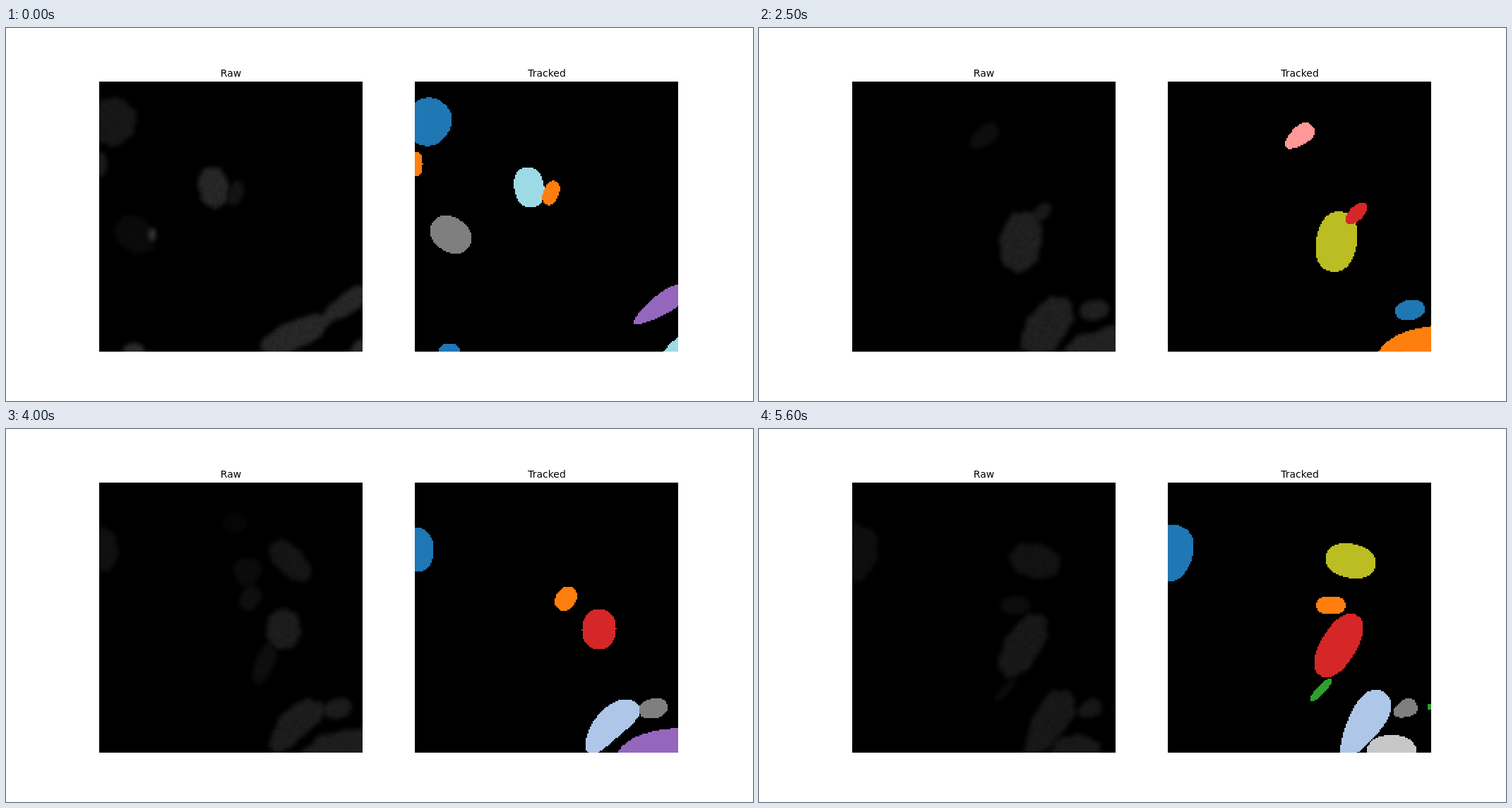
Recreate the animation shown at these times as an HTML page with a canvas. Size 1058 by 529 pixels, loop 5700 ms.

```html
<!DOCTYPE html>
<html lang="en">
<head>
<meta charset="utf-8">
<title>Cell tracking</title>
<style>
  html, body { margin: 0; width: 100%; height: 100%; overflow: hidden; background: #fff; }
  canvas, svg { position: absolute; left: 0; top: 0; }
  text { font: 14px "DejaVu Sans", sans-serif; text-anchor: middle; }
</style>
</head>
<body>
<canvas id="stage" width="1058" height="529"></canvas>
<svg width="1058" height="529">
  <text x="318.5" y="69">Raw</text>
  <text x="766" y="69">Tracked</text>
</svg>
<script>
const ctx = document.getElementById('stage').getContext('2d');
const STEP = 100, LOOP = 5700, PIXEL = 2, SAMPLES = 72;
const KEYS = [0, 700, 1500, 2500, 3500, 4500, 5600];
const TOP = 76, WIDTH = 373, HEIGHT = 383, RAW = 132, TRACKED = 579;

const blue = '#1f77b4', sky = '#aec7e8', orange = '#ff7f0e', peach = '#ffbb78',
  green = '#2ca02c', red = '#d62728', pink = '#ff9896', purple = '#9467bd',
  brown = '#c49c94', gray = '#7f7f7f', silver = '#c7c7c7', olive = '#bcbd22', cyan = '#9edae5';

// A pose is a tilted oval; without a colour it shows only in the raw picture.
const pose = (color, x, y, length, width, tilt = 0, taper = 0, bend = 0) =>
  ({ color, form: [x, y, length, width, tilt, taper, bend] });
const cell = (glow, poses) => ({ glow, poses });

// Poses are numbered by their place in KEYS.
const cells = [
  // left edge
  cell(26, {
    0: pose(blue, 598, 133, 34, 32, -55),
    1: pose(blue, 584, 188, 25, 20, -90, 0.15),
    2: pose(blue, 602, 201, 45, 16, -62),
    4: pose(blue, 578, 177, 36, 24, -90),
    5: pose(blue, 584, 166, 27, 25, -90),
    6: pose(blue, 579, 176, 41, 36, -90, 0.2)
  }),
  cell(30, { 0: pose(orange, 581, 193, 18, 9, 90) }),
  cell(12, { 0: pose(gray, 630, 293, 31, 24, 35) }),
  cell(60, { 0: pose(null, 654, 293, 9, 5, 90) }),
  cell(50, { 0: pose(blue, 628, 461, 16, 14) }),

  // central cell and its neighbours
  cell(44, {
    0: pose(cyan, 741, 226, 29, 21, 80),
    1: pose(null, 760, 230, 54, 28, 38),
    2: pose(null, 782, 260, 55, 16, 80, 0, 30),
    3: pose(olive, 818, 303, 43, 29, 100),
    4: pose(red, 836, 288, 25, 24, 90),
    5: pose(red, 844, 280, 32, 24, 95),
    6: pose(red, 821, 307, 50, 25, 121)
  }),
  cell(22, { 0: pose(orange, 772, 234, 18, 11, -70) }),
  cell(40, { 2: pose(null, 823, 310, 27, 18, -60) }),
  cell(34, { 3: pose(red, 846, 263, 19, 10, -45) }),
  cell(44, { 4: pose(brown, 814, 331, 32, 13, 113) }),
  cell(36, { 4: pose(peach, 789, 204, 21, 19, 90, -0.3) }),
  cell(24, {
    4: pose(orange, 787, 241, 18, 15, -75),
    5: pose(orange, 799, 240, 18, 13, -38),
    6: pose(orange, 810, 250, 21, 13)
  }),
  cell(22, { 6: pose(green, 796, 370, 22, 6, -47) }),

  // top
  cell(20, {
    2: pose(null, 765, 92, 28, 18),
    3: pose(pink, 765, 154, 24, 13, -38, 0.25),
    4: pose(null, 771, 133, 18, 14)
  }),
  cell(34, {
    4: pose(olive, 848, 187, 28, 15, 45, -0.15),
    5: pose(null, 852, 188, 44, 24, 45),
    6: pose(olive, 838, 187, 36, 24, 12)
  }),

  // bottom right
  cell(44, {
    0: pose(null, 855, 436, 52, 20, -25),
    1: pose(null, 848, 434, 48, 21, -30),
    2: pose(sky, 847, 439, 33, 26, -50),
    3: pose(null, 855, 424, 48, 28, -55),
    4: pose(sky, 848, 424, 50, 20, -40, 0, 14),
    5: pose(sky, 861, 415, 49, 22, -50, 0.35),
    6: pose(sky, 856, 420, 55, 23, -58, 0.35)
  }),
  cell(44, {
    0: pose(purple, 926, 394, 44, 14, -34, 0.35),
    1: pose(gray, 920, 388, 36, 13, -45),
    2: pose(gray, 921, 400, 26, 12, -32, 0.3),
    3: pose(blue, 922, 400, 21, 14, -10),
    4: pose(gray, 914, 400, 21, 14, -15, 0.1),
    5: pose(gray, 919, 393, 20, 14, -12),
    6: pose(gray, 915, 397, 18, 12, -25, 0.3)
  }),
  cell(46, {
    0: pose(cyan, 955, 462, 32, 20, -45),
    1: pose(silver, 938, 455, 42, 27, -30),
    2: pose(silver, 945, 462, 58, 31, -8),
    3: pose(orange, 948, 466, 74, 42, -10),
    4: pose(purple, 948, 468, 84, 42, -10),
    5: pose(purple, 916, 460, 54, 33, -10),
    6: pose(silver, 896, 461, 36, 27)
  }),
  cell(20, { 6: pose(green, 953, 394, 6, 5) })
];

const mix = (a, b, f) => a + (b - a) * f;
const rounded = v => Math.sign(v) * Math.abs(v) ** 0.9;

function outline([x, y, length, width, tilt, taper, bend], rough = 0) {
  const c = Math.cos(tilt * Math.PI / 180), s = Math.sin(tilt * Math.PI / 180);
  return Array.from({ length: SAMPLES }, (_, i) => {
    const angle = 2 * Math.PI * i / SAMPLES;
    const u = rounded(Math.cos(angle));
    const ragged = 1 + rough * (Math.sin(7 * angle + x / 9) + Math.sin(12 * angle + y / 9));
    const along = length * u * ragged;
    const across = width * rounded(Math.sin(angle)) * (1 + taper * u) * ragged + bend * u * u;
    return [x + along * c - across * s, y + along * s + across * c];
  });
}

// State of a cell at fraction f between two neighbouring keys.
function stateAt({ glow, poses }, key, f) {
  const a = poses[key], b = poses[key + 1];
  if (!a && !b) return null;
  const from = (a || b).form, to = (b || a).form;
  return {
    form: from.map((v, i) => mix(v, to[i], f)),
    color: (f < 0.5 ? a : b)?.color,
    level: glow * mix(a ? 1 : 0, b ? 1 : 0, f)
  };
}

// Fixed seeded grain that darkens the raw picture slightly.
const grain = document.createElement('canvas');
grain.width = 187;
grain.height = 192;
const grainCtx = grain.getContext('2d');
for (let i = 0, seed = 7; i < grain.width * grain.height; i++) {
  seed = (seed * 16807) % 2147483647;
  grainCtx.fillStyle = `rgba(0,0,0,${0.25 * seed / 2147483647})`;
  grainCtx.fillRect(i % grain.width, Math.floor(i / grain.width), 1, 1);
}

// Scanline fill in square pixels with hard edges.
function fillPixels(points) {
  const snap = x => TRACKED + PIXEL * Math.round((x - TRACKED) / PIXEL);
  for (let y = TOP; y < TOP + HEIGHT; y += PIXEL) {
    const mid = y + PIXEL / 2, hits = [];
    points.forEach((p, i) => {
      const q = points[(i + 1) % points.length];
      if ((p[1] <= mid) !== (q[1] <= mid))
        hits.push(mix(p[0], q[0], (mid - p[1]) / (q[1] - p[1])));
    });
    hits.sort((m, n) => m - n);
    for (let i = 0; i + 1 < hits.length; i += 2) {
      const x = snap(hits[i]);
      ctx.fillRect(x, y, snap(hits[i + 1]) - x, PIXEL);
    }
  }
}

function panel(x, paint) {
  ctx.save();
  ctx.beginPath();
  ctx.rect(x, TOP, WIDTH, HEIGHT);
  ctx.clip();
  ctx.fillStyle = '#000';
  ctx.fillRect(x, TOP, WIDTH, HEIGHT);
  paint();
  ctx.restore();
}

function paintRaw(states, fade) {
  ctx.globalCompositeOperation = 'lighten';
  ctx.filter = 'blur(3px)';
  for (const { form, level } of states) {
    const v = level * fade;
    ctx.fillStyle = `rgb(${v},${v},${v})`;
    ctx.beginPath();
    outline(form, 0.04).forEach(([x, y]) => ctx.lineTo(x - TRACKED + RAW, y));
    ctx.fill();
  }
  ctx.filter = 'none';
  ctx.globalCompositeOperation = 'source-over';
  ctx.drawImage(grain, RAW, TOP, 374, 384);
}

function paintTracked(states) {
  for (const { form, color } of states) {
    if (!color) continue;
    ctx.fillStyle = color;
    fillPixels(outline(form));
  }
}

function draw(time) {
  const key = KEYS.findLastIndex((t, i) => t <= time && i < KEYS.length - 1);
  const f = (time - KEYS[key]) / (KEYS[key + 1] - KEYS[key]);
  const states = cells.map(c => stateAt(c, key, f)).filter(Boolean);
  ctx.clearRect(0, 0, 1058, 529);
  panel(RAW, () => paintRaw(states, mix(1, 0.6, time / LOOP)));
  panel(TRACKED, () => paintTracked(states));
}

let shown = -1;
function tick(now) {
  const step = Math.floor((now % LOOP) / STEP);
  if (step !== shown) draw((shown = step) * STEP);
  requestAnimationFrame(tick);
}
draw(0);
requestAnimationFrame(tick);
</script>
</body>
</html>
```
